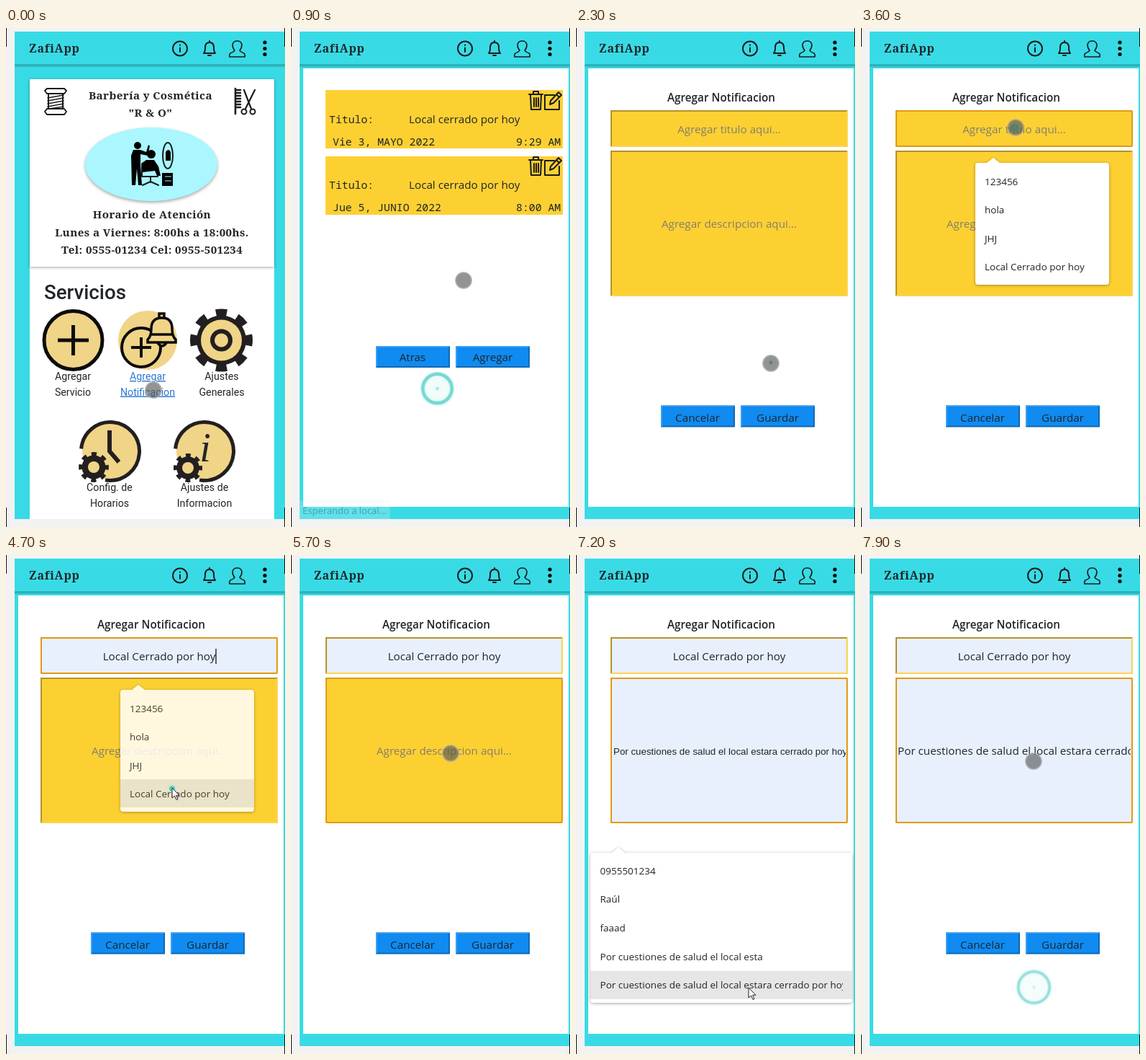
An HTML page that plays this animation: 388x692 px, repeating every 8 s.

```html
<!DOCTYPE html>
<html lang="es">
<head>
<meta charset="utf-8">
<title>Agregar notificacion</title>
<style>
html, body { margin: 0; width: 100%; height: 100%; overflow: hidden; background: #f2f2f2; }
svg { display: block; width: 100%; height: 100%; }
text { font: 15.25px "Open Sans", sans-serif; fill: #212529; }
.mid { text-anchor: middle; }
.serif text, .brand { font: 600 15.2px "Noto Serif", serif; letter-spacing: .4px; }
.label text { font: 14.2px Roboto, sans-serif; text-anchor: middle; }
.label .link { fill: #2f78d0; text-decoration: underline; }
.mono { font: 14.8px "Noto Sans Mono", monospace; }
.menu text { font-size: 13.5px; }
.preview text { font: 13.33px "Liberation Sans", Arial, sans-serif; }
.hint { fill: #757575; fill-opacity: .9; }
.line { fill: none; stroke: #1c1c1c; stroke-width: 2; stroke-linejoin: round; stroke-linecap: round; }
.panel { fill: #fff; filter: drop-shadow(0 1px 2px rgba(0,0,0,.35)); }

/* One 8 s clock: 1% = 80 ms */
.cut, .flow { animation: 8s infinite step-end; }
.flow { animation-timing-function: linear; }

@keyframes services { 0% { opacity: 1 } 7.5%, to { opacity: 0 } }
@keyframes list { 0% { opacity: 0 } 7.5% { opacity: 1 } 27.5%, to { opacity: 0 } }
@keyframes form { 0% { opacity: 0 } 27.5%, to { opacity: 1 } }
@keyframes status { 0%, 6% { opacity: 0 } 6.3%, 9% { opacity: .9 } 12.8%, to { opacity: 0 } }

@keyframes titleFocus { 0% { opacity: 0 } 44.2% { opacity: 1 } 71.2%, to { opacity: 0 } }
@keyframes titleHint { 0% { opacity: 1 } 52.5%, to { opacity: 0 } }
@keyframes titleFill { 0% { opacity: 0 } 52.5%, to { opacity: 1 } }
@keyframes titleText { 0% { opacity: 0 } 57.75%, to { opacity: 1 } }
@keyframes caret { 0% { opacity: 0 } 57.75% { opacity: 1 } 64.5%, to { opacity: 0 } }
@keyframes t1 { 0% { opacity: 0 } 52.5% { opacity: 1 } 53.5%, to { opacity: 0 } }
@keyframes t2 { 0% { opacity: 0 } 53.5% { opacity: 1 } 54.5%, to { opacity: 0 } }
@keyframes t3 { 0% { opacity: 0 } 54.5% { opacity: 1 } 55.5%, to { opacity: 0 } }
@keyframes t4 { 0% { opacity: 0 } 55.5% { opacity: 1 } 57.75%, to { opacity: 0 } }
@keyframes menu1 {
  0%, 44.5% { opacity: 0 } 44.9% { opacity: 1 }
  57.9% { opacity: 1; animation-timing-function: ease-in } 60.5%, to { opacity: 0 }
}
@keyframes row1 {
  0% { opacity: 0 } 52.8% { opacity: 1; transform: none } 53.8% { opacity: 1; transform: translateY(39.3px) }
  54.8% { opacity: 1; transform: translateY(78.6px) } 55.8%, to { opacity: 1; transform: translateY(118px) }
}

@keyframes descFocus { 0% { opacity: 0 } 71.2%, to { opacity: 1 } }
@keyframes descHint { 0% { opacity: 1 } 79.8%, to { opacity: 0 } }
@keyframes descFill { 0% { opacity: 0 } 79.8%, to { opacity: 1 } }
@keyframes descText { 0% { opacity: 0 } 91.9%, to { opacity: 1 } }
@keyframes d1 { 0% { opacity: 0 } 79.8% { opacity: 1 } 80.5%, to { opacity: 0 } }
@keyframes d2 { 0% { opacity: 0 } 80.5% { opacity: 1 } 81%, to { opacity: 0 } }
@keyframes d3 { 0% { opacity: 0 } 81% { opacity: 1 } 81.8%, to { opacity: 0 } }
@keyframes d4 { 0% { opacity: 0 } 81.8% { opacity: 1 } 83.3%, to { opacity: 0 } }
@keyframes d5 { 0% { opacity: 0 } 83.3% { opacity: 1 } 91.9%, to { opacity: 0 } }
@keyframes menu2 {
  0%, 72% { opacity: 0 } 72.5% { opacity: 1 }
  91.9% { opacity: 1; animation-timing-function: ease-in } 94.5%, to { opacity: 0 }
}
@keyframes row2 {
  0% { opacity: 0 } 80% { opacity: 1; transform: none } 80.8% { opacity: 1; transform: translateY(39.7px) }
  81.9% { opacity: 1; transform: translateY(79.4px) } 82.6% { opacity: 1; transform: translateY(119.1px) }
  84%, to { opacity: 1; transform: translateY(158.8px) }
}

@keyframes pointer {
  0%, 5.6% { transform: translate(205px, 502px) }
  10.8%, 16% { transform: translate(240px, 350px) }
  25.5%, 38.5% { transform: translate(271px, 465px) }
  43.8%, 50% { transform: translate(215px, 138px) }
  52% { transform: translate(218px, 192px) }
  56%, 61.3% { transform: translate(231px, 323px) }
  68.8%, 73% { transform: translate(222px, 275px) }
  79% { transform: translate(245px, 412px) }
  81.25% { transform: translate(253px, 535px) }
  85%, 92.5% { transform: translate(240px, 600px) }
  98%, to { transform: translate(240px, 286px) }
}
@keyframes dot {
  0% { opacity: 1 } 52% { opacity: 0 } 61.3% { opacity: 1 } 79% { opacity: 0 } 92.5%, to { opacity: 1 }
}
@keyframes arrow {
  0% { opacity: 0 } 52% { opacity: 1 } 61.3% { opacity: 0 } 79% { opacity: 1 } 92.5%, to { opacity: 0 }
}

/* Click ripples start at --at and last 10% of the loop */
.ripple { filter: drop-shadow(0 0 2px rgba(70,205,195,.4)); animation: fade 8s linear var(--at) infinite backwards; }
.ring {
  fill: rgba(255,255,255,.5); stroke: #48cdc3;
  animation: grow 8s var(--at) infinite backwards, thin 8s linear var(--at) infinite backwards;
}
.core { fill: #48cdc3; fill-opacity: .6; animation: shrink 8s linear var(--at) infinite backwards; }
@keyframes fade { 0% { opacity: 0 } .1%, 4.7% { opacity: 1 } 10%, to { opacity: 0 } }
@keyframes grow { 0% { r: 0px; animation-timing-function: cubic-bezier(.333,.667,.667,1) } 10%, to { r: 24px } }
@keyframes thin { 0% { stroke-width: 1px } 2% { stroke-width: 8px } 10%, to { stroke-width: 1.5px } }
@keyframes shrink { 0% { r: 1px } 1% { r: 5px } 10%, to { r: 0px } }
</style>
</head>
<body>
<svg viewBox="0 0 388 692" preserveAspectRatio="none">
<defs>
  <g id="gear">
    <circle r="38" fill="none" stroke="#231f20" stroke-width="11" pathLength="16" stroke-dasharray="1" stroke-dashoffset=".5"/>
    <circle r="34.500" fill="#231f20"/>
  </g>
  <g id="bin" class="line">
    <path d="M331 92H350M337 91V88H344V91M333 93L334 113H347L348 93M338 97V109M341 97V109M344 97V109"/>
  </g>
  <g id="pencil" class="line">
    <path d="M366 93H353V113H373V101M360 106L361 101L372 89L376 93L365 104ZM369 92L373 96"/>
  </g>
  <g id="button">
    <path fill="#0b69b8" d="M0 0H103V30H0Z"/>
    <path fill="#3a9ff5" d="M0 0H103L101 2H2V28L0 30Z"/>
    <path fill="#0f8bf1" d="M2 2H101V28H2Z"/>
  </g>
  <clipPath id="descClip"><path d="M51 172H375V370H51Z"/></clipPath>
  <clipPath id="menuClip"><path d="M20 413H371V621H20Z"/></clipPath>
  <linearGradient id="shade" x2="0" y2="1">
    <stop stop-color="#000" stop-opacity=".3"/><stop offset="1" stop-color="#000" stop-opacity="0"/>
  </linearGradient>
</defs>

<path fill="#f2f2f2" d="M0 0H388V692H0Z"/>
<path fill="#38dbe5" d="M12 5H388V681H12Z"/>

<g class="cut" style="animation-name:services">
  <path fill="#fff" d="M33 330H373V681H33Z"/>
  <path class="panel" d="M33 71H373V331H33Z"/>
  <g class="line">
    <path d="M57 84H81L84 87L81 91H57L54 87ZM57 112H81L84 116L81 120H57L54 116ZM59 92V111M79 92V111"/>
    <path d="M58 97L80 93M58 101L80 97M58 105L80 101M58 109L80 105M60 112L80 109" stroke-width="1.600"/>
    <path d="M319 84V119M321 86H326M321 90H326M321 94H326M321 98H326M321 102H326M321 106H326M321 110H326" stroke-width="2.600"/>
    <path d="M346 86L333 112M331 86L341 112" stroke-width="2.200"/>
    <circle cx="331" cy="116" r="3.500"/><circle cx="343" cy="116" r="3.500"/>
  </g>
  <g class="serif mid">
    <text x="201" y="99">Barbería y Cosmética</text>
    <text x="201" y="123">"R &amp; O"</text>
    <text x="203" y="264">Horario de Atención</text>
    <text x="203" y="289">Lunes a Viernes: 8:00hs a 18:00hs.</text>
    <text x="203" y="313">Tel: 0555-01234 Cel: 0955-501234</text>
  </g>
  <ellipse cx="202" cy="189" rx="92" ry="51" fill="#aaf7ff" style="filter:drop-shadow(0 2px 2px rgba(0,0,0,.35))"/>
  <circle cx="183" cy="163" r="5"/>
  <path d="M177 169H187L195 172L198 162L200 164L197 177L187 175V190L189 218H184L182 195L180 218H175L174 177Z"/>
  <circle cx="202" cy="175" r="6"/>
  <path d="M195 183H206L212 192L215 205H210L207 198L190 200L188 188Z"/>
  <path class="line" d="M189 190V206H211M201 207V214M190 218L201 213L212 218" stroke-width="1.600"/>
  <ellipse class="line" cx="225" cy="177" rx="7" ry="18"/>
  <path d="M222 172Q226 166 229 172V184H222ZM217 201H232V219H217Z"/>
  <path d="M221 206H230M221 212H230" stroke="#aaf7ff"/>

  <text x="53" y="376" style="font:500 27.700px Roboto,sans-serif">Servicios</text>
  <g fill="#f0d487" stroke="#0c0c0c">
    <circle cx="93.500" cy="433" r="40.500" stroke-width="5"/>
    <path d="M72 433H115M93.500 412V454" stroke-width="5"/>
    <circle cx="197" cy="433" r="41" stroke="none"/>
    <circle cx="188" cy="443" r="27" stroke-width="4"/>
    <path d="M174 443H202M188 429V457" stroke-width="4"/>
    <path d="M197 432Q202 428 202 417Q202 402 217 402Q231 402 231 417Q231 428 236 432V436H197ZM202 425H231M211 437Q217 445 223 437M213 402V396H220V402" stroke-width="3.500"/>
  </g>
  <use href="#gear" x="299.500" y="433"/>
  <g fill="#f0d487">
    <circle cx="299.500" cy="433" r="28.500"/>
    <circle cx="299.500" cy="433" r="12.500" stroke="#231f20" stroke-width="6"/>
    <circle cx="145" cy="587" r="39"/>
    <circle cx="276" cy="587" r="39"/>
  </g>
  <g fill="none" stroke="#231f20">
    <circle r="40.500" transform="translate(145 587) rotate(185)" stroke-width="5" pathLength="360" stroke-dasharray="275 85"/>
    <circle r="40.500" transform="translate(276 587) rotate(185)" stroke-width="5" pathLength="360" stroke-dasharray="275 85"/>
    <path d="M144 558V587L157 602" stroke-width="6"/>
  </g>
  <text x="277" y="601" class="mid" style="font:italic 56px 'Liberation Serif',serif">i</text>
  <g fill="#f0d487">
    <use href="#gear" transform="translate(122 609) scale(.48)"/><circle cx="122" cy="609" r="8"/>
    <use href="#gear" transform="translate(253 610) scale(.46)"/><circle cx="253" cy="610" r="8"/>
  </g>
  <g class="label">
    <text x="93" y="488">Agregar</text><text x="93" y="509.500">Servicio</text>
    <text x="197" y="488" class="link">Agregar</text><text x="197" y="509.500" class="link">Notificacion</text>
    <text x="300" y="488">Ajustes</text><text x="300" y="509.500">Generales</text>
    <text x="144" y="642">Config. de</text><text x="144" y="664">Horarios</text>
    <text x="276" y="642">Ajustes de</text><text x="276" y="664">Informacion</text>
  </g>
</g>

<g class="cut" style="animation-name:list">
  <path fill="#fff" d="M17 56H386V664H17Z"/>
  <path fill="#fdd032" d="M48 86H378V167H48ZM48 178H378V259H48Z"/>
  <use href="#bin"/><use href="#pencil"/>
  <use href="#bin" y="91"/><use href="#pencil" y="91"/>
  <text class="mono" x="53" y="132">Titulo:</text><text x="164" y="132">Local cerrado por hoy</text>
  <text class="mono" x="58" y="163">Vie 3, MAYO 2022</text><text class="mono" x="313" y="163">9:29 AM</text>
  <text class="mono" x="53" y="223">Titulo:</text><text x="164" y="223">Local cerrado por hoy</text>
  <text class="mono" x="58" y="254">Jue 5, JUNIO 2022</text><text class="mono" x="313" y="254">8:00 AM</text>
  <use href="#button" x="118" y="441"/><use href="#button" x="229" y="441"/>
  <text class="mid" x="169" y="462">Atras</text><text class="mid" x="280.500" y="462">Agregar</text>
</g>

<g class="flow" style="animation-name:status">
  <path fill="#f4f7f7" fill-opacity=".6" stroke="#ddd" d="M12 656H134Q137 656 137 659V681H12Z"/>
  <text x="16" y="674" style="font-size:13px;fill:#444">Esperando a local...</text>
</g>
<g class="ripple" transform="translate(203.500 500)" style="--at:.42s"><circle class="ring"/><circle class="core"/></g>

<g class="cut" style="animation-name:form">
  <path fill="#fff" d="M17 56H386V664H17Z"/>
  <text class="mid" x="202" y="102" style="font-weight:600">Agregar Notificacion</text>

  <path fill="#fdd032" d="M48 114H378V165H48ZM48 170H378V372H48Z"/>
  <path class="cut" style="animation-name:titleFill" fill="#e8f0fe" d="M48 114H378V165H48Z"/>
  <path class="cut" style="animation-name:descFill" fill="#e8f0fe" d="M48 170H378V372H48Z"/>
  <path fill="#b5922a" d="M48 114H378L376 116H50V163L48 165ZM48 170H378L376 172H50V370L48 372Z"/>
  <path fill="#fad44f" d="M378 114V165H48L50 163H376V116ZM378 170V372H48L50 370H376V172Z"/>
  <rect class="cut" style="animation-name:titleFocus" x="49" y="115" width="328" height="49" rx="2" fill="none" stroke="#e29a12" stroke-width="2"/>
  <rect class="cut" style="animation-name:descFocus" x="49" y="171" width="328" height="200" rx="2" fill="none" stroke="#e29a12" stroke-width="2"/>

  <g class="mid">
    <text class="hint cut" style="animation-name:titleHint" x="213" y="146">Agregar titulo aqui...</text>
    <text class="hint cut" style="animation-name:descHint" x="213" y="277">Agregar descripcion aqui...</text>
    <text class="cut" style="animation-name:titleText" x="213" y="146">Local Cerrado por hoy</text>
  </g>
  <path class="cut" style="animation-name:caret" d="M292 130V151" stroke="#111" stroke-width="1.300"/>
  <g class="preview mid">
    <text class="cut" style="animation-name:t1" x="213" y="145">123456</text>
    <text class="cut" style="animation-name:t2" x="213" y="145">hola</text>
    <text class="cut" style="animation-name:t3" x="213" y="145">JHJ</text>
    <text class="cut" style="animation-name:t4" x="213" y="145">Local Cerrado por hoy</text>
    <text class="cut" style="animation-name:d1" x="213" y="277">0955501234</text>
    <text class="cut" style="animation-name:d2" x="213" y="277">Raúl</text>
    <text class="cut" style="animation-name:d3" x="213" y="277">faaad</text>
    <text class="cut" style="animation-name:d4" x="213" y="277">Por cuestiones de salud el local esta</text>
  </g>
  <g clip-path="url(#descClip)">
    <g class="preview"><text class="cut" style="animation-name:d5" x="52" y="277">Por cuestiones de salud el local estara cerrado por hoy</text></g>
    <text class="cut" style="animation-name:descText" x="51" y="277">Por cuestiones de salud el local estara cerrado por hoy</text>
  </g>

  <use href="#button" x="118" y="523.500"/><use href="#button" x="229" y="523.500"/>
  <text class="mid" x="169" y="546">Cancelar</text><text class="mid" x="280.500" y="546">Guardar</text>

  <g class="menu flow" style="animation-name:menu1">
    <path class="panel" d="M163 187H175L184 180L193 187H341Q345 187 345 191V352Q345 356 341 356H163Q159 356 159 352V191Q159 187 163 187Z"/>
    <path class="cut" style="animation-name:row1" fill="#e6e6e6" d="M159 193H345V232H159Z"/>
    <text x="172" y="218">123456</text><text x="172" y="257">hola</text>
    <text x="172" y="297">JHJ</text><text x="172" y="336">Local Cerrado por hoy</text>
  </g>
  <g class="menu flow" style="animation-name:menu2">
    <path class="panel" d="M24 413H50L59 405L68 413H380Q384 413 384 417V617Q384 621 380 621H24Q20 621 20 617V417Q20 413 24 413Z"/>
    <path class="cut" style="animation-name:row2" fill="#e6e6e6" d="M20 418H384V457H20Z"/>
    <g clip-path="url(#menuClip)">
      <text x="33.500" y="443">0955501234</text><text x="33.500" y="482">Raúl</text><text x="33.500" y="522">faaad</text>
      <text x="33.500" y="562">Por cuestiones de salud el local esta</text>
      <text x="33.500" y="601">Por cuestiones de salud el local estara cerrado por hoy</text>
    </g>
  </g>

  <g class="ripple" transform="translate(271 464)" style="--at:2.28s"><circle class="ring"/><circle class="core"/></g>
  <g class="ripple" transform="translate(214 138)" style="--at:3.54s"><circle class="ring"/><circle class="core"/></g>
  <g class="ripple" transform="translate(231 324)" style="--at:4.66s"><circle class="ring"/><circle class="core"/></g>
  <g class="ripple" transform="translate(222 275)" style="--at:5.7s"><circle class="ring"/><circle class="core"/></g>
  <g class="ripple" transform="translate(240.500 599.500)" style="--at:7.35s"><circle class="ring"/><circle class="core"/></g>
</g>

<path fill="#38dbe5" d="M12 5H388V51H12Z"/>
<path fill="url(#shade)" d="M12 50.500H388V55H12Z"/>
<text class="brand" x="32" y="34" style="font-weight:700;font-size:16px;letter-spacing:.8px">ZafiApp</text>
<g class="line">
  <circle cx="242" cy="28.500" r="10"/><path d="M242 27.500V33M242 23.500V24"/>
  <path d="M275 35Q277 33 277 27Q277 20 283 20Q289 20 289 27Q289 33 291 35ZM283 20V18M281 38H285"/>
  <path d="M318 31Q315 28 315 23Q316 18 321.500 18Q327 18 328 23Q328 28 325 31Q326 33 331 35Q333 37 332 40H311Q310 37 312 35Q317 33 318 31Z" stroke-width="1.600"/>
</g>
<circle cx="360" cy="20" r="2.600"/><circle cx="360" cy="28.500" r="2.600"/><circle cx="360" cy="36.500" r="2.600"/>
<path fill="#111" d="M0 0H1V26H0ZM0 665H1V692H0ZM387 0H388V26H387ZM387 665H388V692H387Z"/>

<g class="flow" style="animation-name:pointer">
  <circle class="cut" style="animation-name:dot" r="11" fill="rgb(80,80,80)" fill-opacity=".62" stroke="#aaa" stroke-opacity=".7" stroke-width="2"/>
  <path class="cut" style="animation-name:arrow" d="M0 0V14L3.500 11L6 16.500L8 15.500L5.700 10.300H10Z" fill="#fff" stroke="#222" stroke-width="1"/>
</g>
</svg>
</body>
</html>
```
